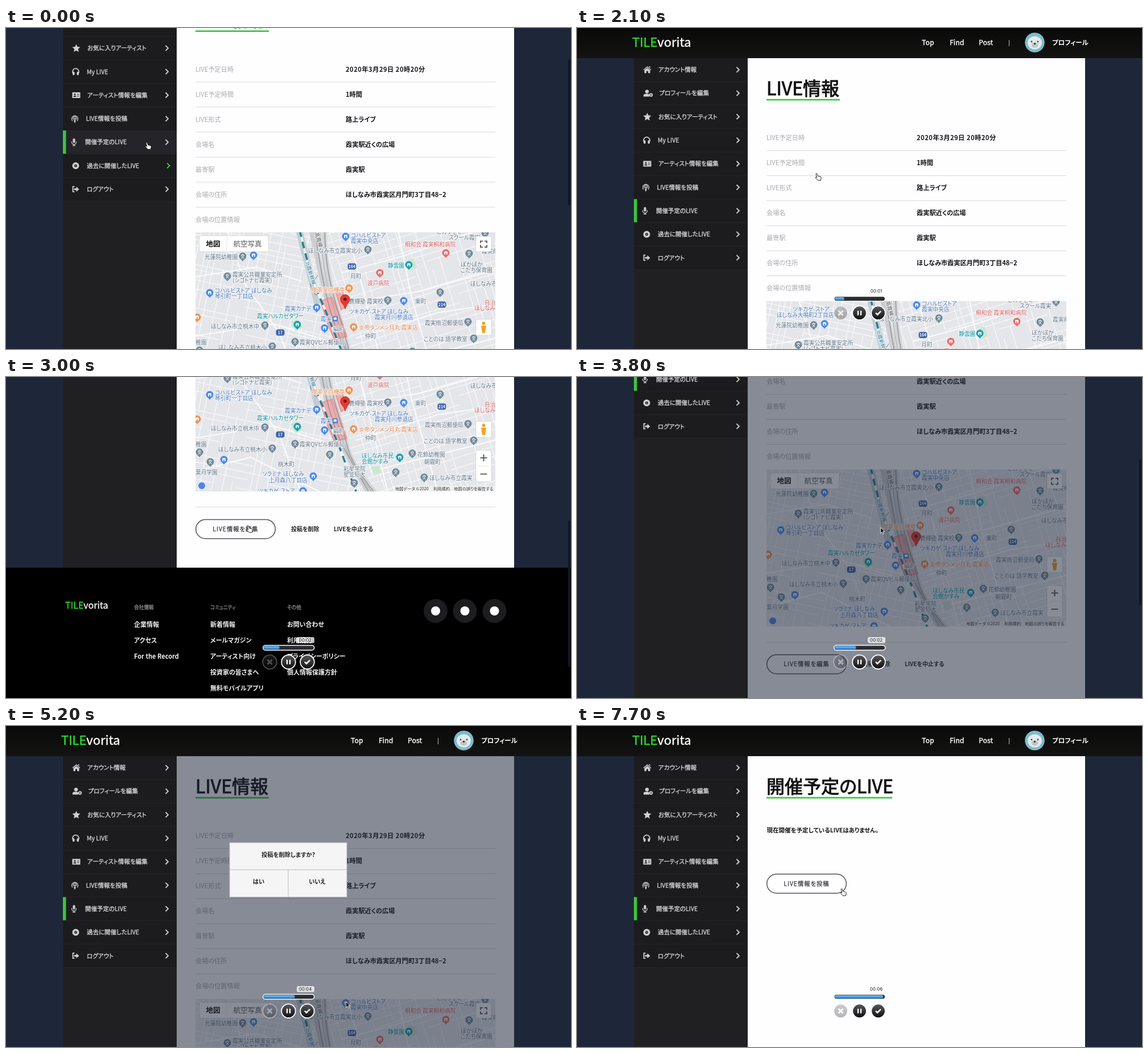
These frames come from a looping animation (993x564 px, 7.8 s). An HTML page:

```html
<!DOCTYPE html>
<html lang="ja">
<head>
<meta charset="utf-8">
<style>
html,body{margin:0;width:100%;height:100%;overflow:hidden;background:#1e2739}
svg{display:block;width:993px;height:564px}
text{font-family:"Noto Sans CJK JP","Noto Sans CJK",sans-serif;font-feature-settings:"palt";white-space:pre}
.map text{paint-order:stroke;stroke:#f4f4f6;stroke-width:2px;stroke-linejoin:round}
.map .ui text{stroke:none}
</style>
</head>
<body>
<svg id="stage" viewBox="0 0 993 564"></svg>
<script>
const LOOP = 7800, STEP = 100, MAP_SHIFT = 120.5, FOOT_SHIFT = 554.5;
const esc = s => s.replace(/&/g, '&amp;');

// Text placed by the vertical centre of its line; a thin outline gives the medium weight
const text = (s, x, y, size, fill, weight = 400, extra = '') =>
  `<text x="${x}" y="${y + size * .37}" font-size="${size}" fill="${fill}" font-weight="${weight}" ` +
  `${weight == 500 ? `stroke="${fill}" stroke-width="${size * .03}"` : ''} ${extra}>${esc(s)}</text>`;
const mid = 'text-anchor="middle"';
const rect = (x, y, w, h, fill, extra = '') =>
  `<rect x="${x}" y="${y}" width="${w}" height="${h}" fill="${fill}" ${extra}/>`;
const circle = (x, y, r, fill, extra = '') => `<circle cx="${x}" cy="${y}" r="${r}" fill="${fill}" ${extra}/>`;
const path = (d, stroke, w, extra = '') => `<path d="${d}" fill="none" stroke="${stroke}" stroke-width="${w}" ${extra}/>`;
const group = (id, body, extra = '') => `<g id="${id}" ${extra}>${body}</g>`;
const move = (x, y) => `transform="translate(${x} ${y})"`;
const logo = (x, y, size) =>
  `<text x="${x}" y="${y + size * .36}" font-size="${size}" stroke-width="${size * .018}" fill="#fff" stroke="#fff">` +
  '<tspan fill="#2be02b" stroke="#2be02b">TILE</tspan>vorita</text>';
const pill = (y, label) =>
  rect(333.7, y, 139.6, 33.4, 'none', 'rx="16.7" stroke="#555" stroke-width="1.5"') +
  text(label, 403.5, y + 16.5, 10.3, '#444', 500, mid + ' letter-spacing="1"');

/* ---------- header and side menu ---------- */
function header() {
  const links = [['Top', 606], ['Find', 655], ['Post', 706]];
  return rect(0, 0, 993, 53, 'url(#bar)') + logo(97, 25.5, 22) +
    links.map(([s, x]) => text(s, x, 25.5, 12.3, '#fff', 500)).join('') +
    rect(759, 21, 1, 11, '#bbb') +
    circle(804.5, 25.5, 17.3, '#7cbccb') +
    '<ellipse cx="804.5" cy="26" rx="12.5" ry="11.5" fill="#e4ebeb"/>' +
    '<ellipse cx="804.5" cy="30" rx="6" ry="4.5" fill="#bcc7c8"/>' +
    circle(799, 24, 1.4, '#444') + circle(810, 24, 1.4, '#444') + circle(804.5, 27.5, 1.8, '#444') +
    text('プロフィール', 835, 25.5, 11.5, '#fff', 700);
}

const icons = [
  '<path d="M-7 0L0-6 7 0 6 1 0-4-6 1zM-5 1L0-3 5 1V6H1.500V2.500H-1.500V6H-5zM3-6H5V-3L3-4.500z"/>',
  '<circle cx="-2" cy="-3" r="3.200"/><path d="M-8 6V3Q-7 1-4 1H0Q2 1 2 6z"/><circle cx="5" cy="3" r="2.200" fill="none" stroke="#d0d0d2" stroke-width="2"/>',
  '<path d="M0-7L2-2.300 7-1.800 3.300 1.600 4.300 6.500 0 4-4.300 6.500-3.300 1.600-7-1.800-2-2.300z"/>',
  '<path d="M-5.500 2V0a5.500 5.500 0 0 1 11 0V2" fill="none" stroke="#d0d0d2" stroke-width="1.700"/><rect x="-5.500" y="0" width="3.500" height="6" rx="1.500"/><rect x="2" y="0" width="3.500" height="6" rx="1.500"/>',
  '<path fill-rule="evenodd" d="M-7-5H7V5H-7zM-5 3H0Q0 .8-2.500.8T-5 3zM1.500-2V-1H5V-2zM1.500 1V2H5V1zM-4-1.500a1.500 1.500 0 1 0 3 0a1.500 1.500 0 1 0-3 0z"/>',
  '<path d="M-4 4a5.500 5.500 0 1 1 8 0M-2 1.500a3 3 0 1 1 4 0" fill="none" stroke="#d0d0d2" stroke-width="1.300"/><circle r="1.500"/><path d="M-1.500 2H1.500L1 7H-1z"/>',
  '<rect x="-2" y="-6.500" width="4" height="8" rx="2"/><path d="M-4-1V0a4 4 0 0 0 8 0V-1M0 4V6M-2.500 6H2.500" fill="none" stroke="#d0d0d2" stroke-width="1.300"/>',
  '<path fill-rule="evenodd" d="M-6 0a6 6 0 1 1 12 0a6 6 0 1 1-12 0M-2.500 0a2.500 2.500 0 1 0 5 0a2.500 2.500 0 1 0-5 0"/><circle r="1"/>',
  '<path d="M-2-4.500H-5V4.500H-2" fill="none" stroke="#d0d0d2" stroke-width="1.800"/><path d="M-3-1.500H1V-4.500L6 0 1 4.500V1.500H-3z"/>'
];
const menu = [
  ['アカウント情報', 143], ['プロフィールを編集', 144.5], ['お気に入りアーティスト', 143],
  ['My LIVE', 142], ['アーティスト情報を編集', 143], ['LIVE情報を投稿', 140.5],
  ['開催予定のLIVE', 139], ['過去に開催したLIVE', 142], ['ログアウト', 142]
];
function sideMenu() {
  let out = rect(100, 53, 200, 836.5, '#202022') + rect(100, 53, 200, 372, '#1c1c1f');
  menu.forEach(([label, x], i) => {
    const y = 73.3 + i * 41.3;
    if (i == 6) out += group('hover', rect(100, y - 20.5, 200, 41, '#252529')) + rect(100, y - 20.5, 5.5, 41, '#3fc242');
    out += rect(100, y + 20.3, 200, 1, '#252528') +
      `<g ${move(x - 19.5, y)} fill="#d0d0d2">${icons[i]}</g>` +
      text(label, x, y, 10.5, '#d6d6d8', 500) +
      path(`M280.500 ${y - 4.5}l4.500 4.500-4.500 4.500`, '#d8d8da', 1.8, `id="arrow${i}"`);
  });
  return out;
}

/* ---------- map ---------- */
const tint = { g: '#64798a', b: '#4a7cc4', t: '#0c95a5', o: '#ee8a48', r: '#dd6262' };
const fillOf = { g: '#6f8a9b', b: '#4a8bee', t: '#13a3b3', o: '#f4924f', r: '#ee6c6c' };
const places = [
  ['b', 606, 364, 'コハルビストア|霞実中央店'], ['b', 379, 374, 'ツキカゲ-ストア'], ['b', 351, 384, 'ほしなみ大鳴町2丁目店'],
  ['g', 531, 391, 'ほしなみ市立霞実北小'], ['g', 349, 402, '光蓮院幼稚園'],
  ['g', 398, 433, '霞実公共職業安定所|(シゴトナビ霞実)'], ['b', 367, 461, 'コハルビストア ほしなみ|琴引町一丁目店'],
  ['o', 537, 460, '喫茶室白樺亭'], ['g', 603, 480, '蒼輝塾 霞実校'], ['b', 490, 493, '霞実カナデ'],
  ['b', 603, 498, 'ツキカゲ-ストア ほしなみ'], ['b', 648, 508, '霞実月川参道店'], ['t', 441, 506, '霞実ハルカゼタワー'],
  ['b', 553, 511, '霞実'], ['g', 360, 524, 'ほしなみ市立桃木中'], ['o', 620, 526, '炎帝タンメン月丸 霞実店'],
  ['g', 516, 552, '霞実QVビル郵便局'], ['g', 373, 561, 'ほしなみ市立桃木小'], ['r', 701, 380, '桐和会 霞実桐和病院'],
  ['t', 671, 417, '静雲園'], ['r', 635, 448, '波戸病院'], ['g', 799, 415, 'ぽかぽか|こだち保育園'],
  ['g', 757, 358, 'ヒカゲゼミ'], ['g', 778, 368, 'スクール霞実'], ['g', 736, 518, '霞実雨沼郵便局'],
  ['g', 734, 546, 'ことのは 語学教室'], ['g', 333, 552, '稚園'], ['r', 841, 482, '自治'], ['r', 823, 492, 'ほしなみ'],
  ['g', 816, 449, 'ほしなみ市'], ['g', 836, 392, '霞実南'], ['g', 605, 436, '月町'], ['g', 719, 480, '東町'], ['g', 631, 541, '仲町'],
  ['g', 575, 529, '絹町'], ['g', 478, 587, '桃木町'], ['g', 735, 583, '朝霧町'], ['t', 625, 572, 'ほしなみ市民|会館かすみ'],
  ['g', 723, 570, '花鈴幼稚園'], ['b', 451, 604, 'ソラミナ ほしなみ'], ['b', 462, 615, '上月森八丁目店'],
  ['g', 593, 595, '彩星学院|星並短大'], ['g', 333, 601, '葉月学園'], ['g', 744, 611, 'ほしなみ市立霞実'], ['b', 443, 634, 'ツキカゲ-ストア']
];
const pins = {
  b: '597,366 435,399 358,465 546,491 699,479 560,527 383,579 540,608 522,634',
  g: '636,389 416,401 671,478 455,522 508,551 468,559 814,396 842,360 812,516 822,545 763,464 340,566 359,583 569,570 685,601 735,610 714,568 612,620 389,436',
  t: '512,521 708,416 692,575', o: '603,457 611,525 336,508', r: '773,395 657,430'
};
function streets() {
  let seed = 41;
  const rnd = () => (seed = seed * 16807 % 2147483647) / 2147483647;
  const grid = (cx, angle, clip) => {
    let d = '';
    for (let p = -330; p < 330; p += 8 + rnd() * 13) {
      for (let q = -330; q < 330;) {
        const len = 25 + rnd() * 90;
        if (rnd() < .72) d += `M${p} ${q}v${len}`;
        if (rnd() < .72) d += `M${q} ${p}h${len}`;
        q += len;
      }
    }
    return `<g clip-path="url(#${clip})"><g transform="translate(${cx} 497) rotate(${angle})">${path(d, '#f9f9fb', 1.2)}</g></g>`;
  };
  return grid(440, 12, 'west') + grid(740, -17, 'east') +
    path('M333 437L440 420 520 445M390 359L420 450 480 535 520 640M333 541L470 520 560 548M333 600L430 575 560 640', '#fafafb', 2.2) +
    path('M590 430L700 400 860 345M620 480L730 462 860 425M615 545L760 500 860 485M690 359L712 470 760 640M600 359L625 450 672 640M640 600L860 545', '#fafafb', 2.2);
}
function rails() {
  const main = 'M543 355Q553 430 565 478T592 555 640 640';
  return path('M515 355L543 465 548 485', '#c2cdd3', 12) +
    path('M537 355Q553 430 565 478T592 555 640 640', '#cdced1', 10) +
    path('M559 355Q560 420 576 475T600 560 650 640', '#d3d4d6', 9) +
    path('M553 480L573 473 584 500 599 542 577 547 566 521zM578 459L589 456 599 488 589 495z', '#e99496', 2, 'style="fill:#f0aaaa"') +
    path(main, '#8a8c90', 1.2) + path('M560 355Q561 420 577 475T601 560 650 640', '#96989c', 1.5) +
    path('M552 355Q556 425 571 475T597 558 646 640', '#a6a8ab', 1.2) +
    path('M516 355Q530 415 546 461L562 498 587 560 617 640', '#f7f7f7', 3.5) +
    path('M516 355Q530 415 546 461L562 498 587 560 617 640', '#247f94', 3.5, 'stroke-dasharray="12 9"') +
    path('M535 450Q545 440 548 434M535 450Q537 466 547 470', '#77828c', 1) +
    `<g transform="translate(529 410) rotate(73)">${text('北霞新幹線', 0, 0, 8.5, '#247f94')}</g>` +
    `<g transform="translate(546 359) rotate(74)">${text('高霞線', 0, 0, 9, '#555')}</g>`;
}
function marker(kind, x, y) {
  const c = fillOf[kind];
  return `<g ${move(x, y)}><path d="M-5 3L0 9 5 3z" fill="${c}"/>` + circle(0, 0, 6.5, c) +
    (kind == 'g' ? path('M-3-2H3M0-4V-2M-2.500-1L2.500 4M2.500-1L-2.500 4', '#fff', 1)
                 : rect(-2.8, -2.5, 5.6, 5.5, '#fff', 'rx="1"') + rect(-1, 0, 2, 3, c)) + '</g>';
}
const badge = (n, x, y) => rect(x - 7.5, y - 5.5, 15, 11, '#3d63a8', 'rx="4"') +
  `<text x="${x}" y="${y + 2.6}" font-size="7" font-weight="700" fill="#fff" style="stroke:none" ${mid}>${n}</text>`;
function mapControls() {
  const box = (x, y, w, h) => rect(x, y, w, h, '#fff', 'rx="2" stroke="#000" stroke-opacity=".1"');
  return box(340, 365, 121, 28) + rect(387.5, 366, 1, 26, '#e6e6e6') +
    text('地図', 364, 379, 12.5, '#111', 700, mid) + text('航空写真', 424.5, 379, 12.5, '#555', 400, mid) +
    box(826, 366, 27, 27) + path('M834 378V374.500H838M841 374.500H845V378M845 381V385H841M838 385H834V381', '#666', 2) +
    box(826, 512, 27, 28) + circle(839.5, 519, 3, '#eda52d') +
    '<path d="M835 523H844L843 530 842 536H837L836 530z" fill="#eda52d"/>' +
    box(826, 563, 27, 55) + rect(830, 590, 19, 1, '#e6e6e6') +
    path('M833.500 576H845.500M839.500 570V582M833.500 604.500H845.500', '#666', 2.2);
}
function cityMap() {
  const labels = places.map(([k, x, y, s]) =>
    s.split('|').map((line, i) => text(line, x, y + i * 10, 9.7, tint[k])).join('')).join('');
  const marks = Object.keys(pins).map(k =>
    pins[k].split(' ').map(p => marker(k, ...p.split(',').map(Number))).join('')).join('');
  return `<g class="map" ${move(0, MAP_SHIFT)}><g clip-path="url(#mapBox)">` +
    rect(333, 359, 527, 276, '#e5e6ea') + streets() + rails() +
    '<path d="M500 517l12-5 10 14-13 7zM641 592l14-3 5 13-13 4zM707 408l9-4 7 17-10 4z" fill="#cde7cf"/>' +
    marks + labels + badge(164, 608, 419) + badge(17, 482, 535) + badge(214, 766, 486) +
    rect(574, 506.5, 9, 9, '#3f88e0', 'rx="1.5"') + rect(576, 508.5, 5, 4, '#fff') +
    '<path d="M596 494Q595 488 590 482.500A8.300 8.300 0 1 1 602 482.500Q597 488 596 494z" fill="#e5392f" stroke="#b3241c" stroke-width=".8"/>' +
    circle(596, 476.5, 2.8, '#731510') +
    circle(344, 625, 6, '#4a86ec') + rect(681, 625.5, 179, 9.5, '#f5f5f5', 'opacity=".75"') +
    text('地図データ ©2020', 684, 630, 7.3, '#333') + text('利用規約', 751, 630, 7.3, '#333') +
    text('地図の誤りを報告する', 787, 630, 7.3, '#333') +
    group('controls', mapControls(), 'class="ui"') + '</g></g>';
}

/* ---------- pages ---------- */
const title = (s, w) => text(s, 333, 106, 32, '#111', 500) + rect(333, 124.7, w, 2.7, '#38c938');
function detail() {
  const rows = [
    ['LIVE予定日時', '2020年3月29日 20時20分'], ['LIVE予定時間', '1時間'], ['LIVE形式', '路上ライブ'],
    ['会場名', '霞実駅近くの広場'], ['最寄駅', '霞実駅'], ['会場の住所', 'ほしなみ市霞実区月門町3丁目48−2'], ['会場の位置情報', '']
  ];
  return title('LIVE情報', 129) + rows.map(([k, v], i) => {
    const y = 193.3 + i * 44;
    return text(k, 333, y, 11.2, '#aaaaad') +
      text(v, 597, y, 11.2, '#161616', 700, i ? '' : 'letter-spacing=".5"') +
      (v ? rect(333, y + 21.6, 527, 1, '#d9d9dc') : '');
  }).join('') + cityMap() + rect(333, 782.5, 527, 1, '#d9d9dc') + pill(805, 'LIVE情報を編集') +
    text('投稿を削除', 501, 821.3, 10, '#222', 700) + text('LIVEを中止する', 576, 821.3, 10, '#222', 700);
}
function planned() {
  const rows = [['LIVE予定日', '2020年 03月 29日'], ['LIVE形式', '路上ライブ'], ['会場名', '霞実駅近くの広場']];
  return text('1 件のLIVEを開催する予定です。', 333.5, 178, 9.5, '#808083') +
    rect(333, 205, 155.5, 151, '#e8e8e9') +
    rows.map(([k, v], i) => text(k, 347, 225 + i * 48.3, 10, '#8a8a8c') +
      text(v, 347, 239 + i * 48.3, 10, '#161616', 700, i ? '' : 'letter-spacing=".2"')).join('');
}
const empty = () => text('現在開催を予定しているLIVEはありません。', 333.5, 183, 10.5, '#161616', 700) + pill(260.3, 'LIVE情報を投稿');

function footer() {
  const cols = [
    [225, '会社情報', '企業情報', 'アクセス', 'For the Record'],
    [359, 'コミュニティ', '新着情報', 'メールマガジン', 'アーティスト向け', '投資家の皆さまへ', '無料モバイルアプリ'],
    [494, 'その他', 'お問い合わせ', '利用規約', 'プライバシーポリシー', '個人情報保護方針']
  ];
  return `<g ${move(0, FOOT_SHIFT)}>` + rect(0, 335, 993, 360, '#000') + logo(104, 401.5, 16) +
    cols.map(([x, head, ...list]) => text(head, x, 405, 8.7, '#8c8c8c', 500) +
      list.map((s, i) => text(s, x, 434.5 + i * 28.2, 11, '#f2f2f2', 700)).join('')).join('') +
    [755, 806.5, 858.5].map(x => circle(x, 411, 21, '#1d1d20') + circle(x, 411, 8, '#fff')).join('') + '</g>';
}

const modal = () => rect(393, 205, 206, 95.5, '#f5f5f6', 'stroke="#b9b9bd"') +
  rect(393, 252, 206, 1, '#bdbdc0') + rect(495.5, 252, 1, 48, '#bdbdc0') +
  text('投稿を削除しますか?', 496, 226, 10.3, '#222', 700, mid) +
  text('はい', 444, 273, 10.3, '#222', 700, mid) + text('いいえ', 547, 273, 10.3, '#222', 700, mid);

/* ---------- recorder ---------- */
function recorder() {
  const knob = (x, icon, extra = '') => `<g ${move(x, 500.7)} ${extra}>` +
    circle(0, 0, 12.3, 'url(#knob)', 'stroke="#fff" stroke-width="1.8"') + icon + '</g>';
  return rect(511, 457, 31, 10.5, '#fff', 'rx="3" opacity=".75"') +
    text('', 526, 462.3, 8, '#222', 400, mid + ' id="clock" style="font-family:Inter,sans-serif"') +
    rect(451.7, 471.5, 90, 8.5, '#2b2d31', 'rx="4.2" stroke="#fff" stroke-width="1.5"') +
    rect(453, 473, 0, 5.6, 'url(#fill)', 'rx="2.500" id="progress"') +
    knob(463.5, path('M-4-4L4 4M4-4L-4 4', '#fff', 3), 'opacity=".3"') +
    knob(496.5, path('M-2.500-4V4M2.500-4V4', '#fff', 2.4)) +
    knob(529.5, path('M-4.500 0L-1.500 3 4.500-3', '#fff', 2.6));
}

const grad = (id, a, b) => `<linearGradient id="${id}" x2="0" y2="1"><stop stop-color="${a}"/><stop offset="1" stop-color="${b}"/></linearGradient>`;
const clip = (id, d) => `<clipPath id="${id}"><path d="${d}"/></clipPath>`;
document.getElementById('stage').innerHTML =
  `<defs>${grad('bar', '#0a0a0a', '#131312')}${grad('knob', '#5a5a5c', '#0d0d0e')}${grad('fill', '#6cc0ff', '#2183dd')}` +
  clip('mapBox', 'M333 359H860V635H333z') + clip('west', 'M333 359H535L572 500 620 635H333z') +
  clip('east', 'M535 359H860V635H620L572 500z') + '</defs>' +
  rect(0, 0, 993, 564, '#1e2739') +
  group('page',
    rect(300, 53, 593, 836.5, '#fefdff') + group('detail', detail()) +
    group('list', title('開催予定のLIVE', 221) + group('planned', planned()) + group('empty', empty())) + footer() +
    group('shade', rect(300, 53, 593, 836.5, '#1e2739') + rect(0, 889.5, 993, 360, '#1e2739'), 'opacity=".53"') +
    sideMenu() + header() + group('modal', modal())) +
  rect(988, 0, 4, 257, '#111723', 'rx="2" id="thumb"') +
  group('status', '<path d="M0 549H97Q100 549 100 552V564H0z" fill="#fff"/>' +
    text('', 3.5, 557, 8.2, '#555', 400, 'id="url" style="font-family:Inter,sans-serif"')) +
  group('recorder', recorder()) +
  group('cursor',
    '<path id="hand" d="M-4-5.500q1.500-1.300 2.300.3l1.400 4 3.800.7q1.900.5 1.600 2.600l-.7 4h-5l-4.300-4.500q-.3-1.600 1.300-1.100l1.200.7z" fill="#fff" stroke="#222" stroke-width="1"/>' +
    '<path id="pointer" d="M-2.500-5.500v10l2.400-2.200 1.600 3.600 1.700-.8-1.600-3.500h3.200z" fill="#111" stroke="#fff" stroke-width=".8"/>');

/* ---------- motion ---------- */
const scrollKeys = [[2200, 0], [2300, 20], [2500, 153.5], [2900, 554.5], [3500, 554.5], [3800, 317], [4300, 0]];
const cursorKeys = [
  [0, 250, 207], [800, 250, 207], [1200, 425, 256], [1700, 425, 256], [2500, 423, 267], [3000, 428, 267],
  [3300, 525, 267], [3600, 536, 270], [4400, 536, 270], [5200, 600, 490], [5500, 600, 490],
  [6100, 445, 275], [6700, 445, 275], [7200, 175, 292], [7600, 468, 292]
];
function at(keys, t) {
  const i = keys.findIndex(k => k[0] > t);
  if (i < 0) return keys[keys.length - 1].slice(1);
  if (!i) return keys[0].slice(1);
  const a = keys[i - 1], b = keys[i], u = (t - a[0]) / (b[0] - a[0]);
  return a.slice(1).map((v, j) => v + (b[j + 1] - v) * u);
}
const $ = id => document.getElementById(id);
const show = (id, on) => $(id).style.display = on ? '' : 'none';
const chevron = (i, on) => {
  $('arrow' + i).setAttribute('stroke', on ? '#3fd142' : '#d8d8da');
  $('arrow' + i).setAttribute('transform', `translate(${on ? 2.5 : 0} 0)`);
};

function draw(t) {
  const within = (a, b) => t >= a && t < b;
  const onDetail = t < 1000 || within(1800, 6700), asking = within(3500, 6700);
  const y = t < 1000 ? 120.5 : at(scrollKeys, t)[0];
  $('page').setAttribute('transform', `translate(0 ${-y})`);
  show('detail', onDetail);
  show('list', !onDetail);
  show('planned', t < 1800);
  show('empty', t >= 6700);
  show('controls', t < 1000 || t >= 2700);
  show('shade', asking);
  show('modal', asking);
  show('hover', t < 1000);
  chevron(6, within(100, 1000));
  chevron(7, t < 100);

  show('thumb', t < 700 || within(2300, 4700));
  $('thumb').setAttribute('y', y * .456);
  show('status', within(200, 1000) || within(1200, 1800) || within(6100, 6700));
  $('url').textContent = '18.177.204.238/posts' + (t < 1000 ? '' : '/19');

  show('recorder', t >= 800);
  const run = Math.max(0, t - 850);
  $('clock').textContent = '00:0' + Math.floor(run / 1000);
  $('progress').setAttribute('width', 1.5 + run * .0122);

  const [cx, cy] = at(cursorKeys, t), pointing = within(3500, 6000) || within(6800, 7500);
  $('cursor').setAttribute('transform', `translate(${cx} ${cy})`);
  show('hand', !pointing);
  show('pointer', pointing);
}
const start = performance.now();
function tick() {
  const t = (performance.now() - start) % LOOP;
  draw(Math.floor(t / STEP) * STEP);
  requestAnimationFrame(tick);
}
tick();
</script>
</body>
</html>
```
